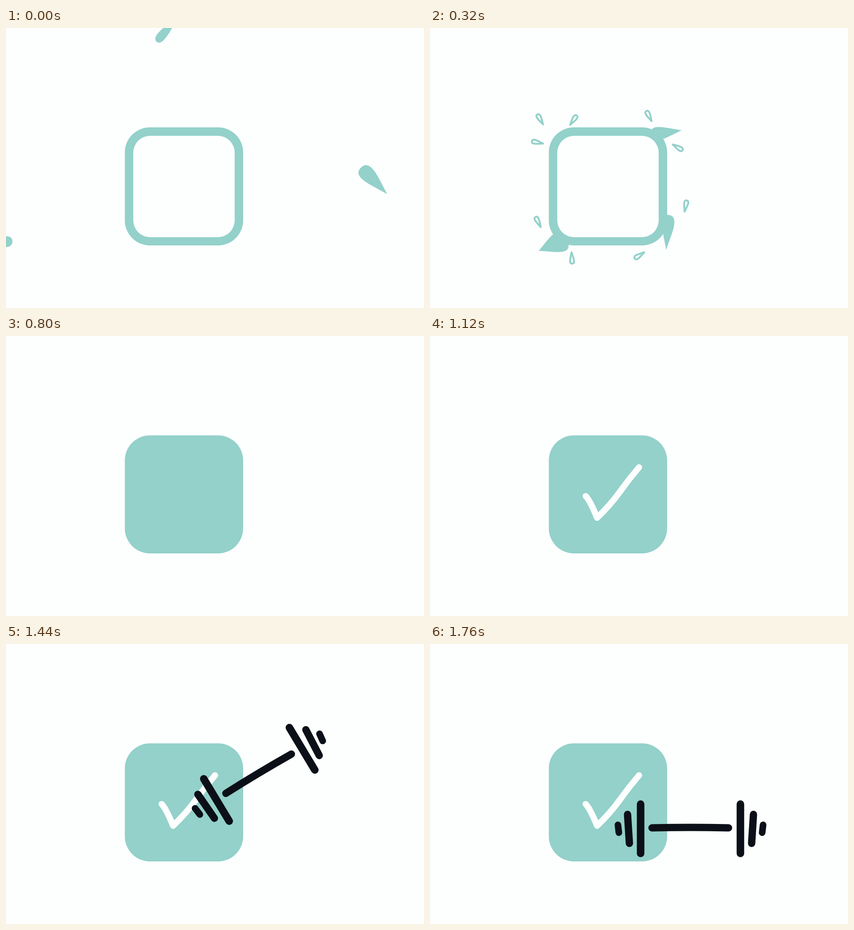
Recreate the animation shown at these times as an HTML page with a canvas. Size 913x613 px, loop 1.84 s.

```html
<!DOCTYPE html>
<html lang="en">
<head>
<meta charset="utf-8">
<title>Checkbox and dumbbell</title>
<style>
  html, body { margin: 0; width: 100%; height: 100%; overflow: hidden; background: #fdfffe; }
  canvas { display: block; }
</style>
</head>
<body>
<canvas id="stage" width="913" height="613"></canvas>
<script>
const ctx = document.getElementById('stage').getContext('2d');
const PAPER = '#fdfffe', MINT = '#93d1ca', INK = '#0b0f17';
const STEP = 80, LOOP = 1840;
const IMPACT = 4, PAINTED = 7, FILLED = 10, CHECKED = 14, FALL = 15, REST = 22;

const rad = degrees => degrees * Math.PI / 180;
const mix = (a, b, t) => a + (b - a) * t;

// Teardrop from tip to round head, bulging by `left` and `right` of its axis
function dropPath({ tip: [x, y], head, left, right }) {
  const dx = head[0] - x, dy = head[1] - y, length = Math.hypot(dx, dy);
  ctx.save();
  ctx.translate(x, y);
  ctx.rotate(Math.atan2(dy, dx));
  ctx.beginPath();
  ctx.moveTo(0, 0);
  ctx.bezierCurveTo(length * 0.4, -left / 2, length, -left * 1.9, length, 0);
  ctx.bezierCurveTo(length, right * 1.9, length * 0.4, right / 2, 0, 0);
  ctx.closePath();
  ctx.restore();
}

const drop = (tip, head, left, right) => ({ tip, head, left, right });
const moved = (d, dx, dy) => ({ ...d, tip: [d.tip[0] + dx, d.tip[1] + dy], head: [d.head[0] + dx, d.head[1] + dy] });
const blend = (a, b, t) => ({
  tip: a.tip.map((v, i) => mix(v, b.tip[i], t)),
  head: a.head.map((v, i) => mix(v, b.head[i], t)),
  left: mix(a.left, b.left, t),
  right: mix(a.right, b.right, t)
});

const topDrop = drop([380, -30], [329, 30], 10, 10);
const bottomDrop = drop([516, 486], [519, 409], 12, 16);
const flights = [
  { steps: IMPACT - 1, from: topDrop, to: moved(topDrop, -60, 205) },
  { steps: IMPACT, from: drop([833, 364], [775, 306], 16, 17), to: drop([550, 224], [484, 226], 20, 9) },
  { steps: IMPACT, from: drop([-60, 468], [14, 467], 12, 13), to: drop([237, 488], [295, 455], 17, 30) },
  { steps: IMPACT, from: moved(bottomDrop, 20, 250), to: bottomDrop }
];

// Tip and direction of each droplet thrown off the box
const splashes = [
  [247, 211, -120], [306, 212, -55], [484, 204, -117],
  [530, 255, 30], [556, 402, -79], [247, 253, -168],
  [242, 436, -117], [309, 491, 86], [468, 491, 147]
];

// Edge of the paint that grows out of each inner corner
const paint = [
  { corner: [278, 236], edge: [[352, 236], [348, 273], [326, 320], [278, 351]] },
  { corner: [500, 236], edge: [[416, 236], [426, 280], [452, 320], [474, 326], [500, 302]] },
  { corner: [500, 458], edge: [[500, 346], [487, 342], [450, 356], [443, 400], [441, 458]] },
  { corner: [278, 458], edge: [[278, 379], [307, 361], [335, 384], [362, 435], [384, 458]] }
];

const check = new Path2D('M340 350.5Q349 359 365 398Q394 370 414 342T456.5 287.5');
const CHECK_LENGTH = 200;

function drawBox(filled) {
  ctx.fillStyle = MINT;
  ctx.beginPath();
  ctx.roundRect(259.5, 217.5, 258.5, 258.5, 55);
  if (!filled) ctx.roundRect(278, 236, 221.5, 222, 37);
  ctx.fill('evenodd');
}

function drawDrops(step) {
  for (const { steps, from, to } of flights) {
    if (step > steps) continue;
    dropPath(blend(from, to, step / steps));
    ctx.fill();
  }
}

function drawSplash(age) {
  const length = 25 - 10 * age, travel = 14 * age;
  ctx.strokeStyle = MINT;
  ctx.lineWidth = 4;
  for (const [x, y, degrees] of splashes) {
    const along = d => [x + d * Math.cos(rad(degrees)), y + d * Math.sin(rad(degrees))];
    dropPath(drop(along(travel), along(travel + length), 4.5, 4.5));
    ctx.stroke();
  }
}

// Catmull-Rom curve through the points
function curveThrough(pts) {
  ctx.moveTo(...pts[0]);
  for (let i = 0; i < pts.length - 1; i++) {
    const b = pts[i], c = pts[i + 1], a = pts[i - 1] ?? b, d = pts[i + 2] ?? c;
    ctx.bezierCurveTo(b[0] + (c[0] - a[0]) / 6, b[1] + (c[1] - a[1]) / 6,
                      c[0] - (d[0] - b[0]) / 6, c[1] - (d[1] - b[1]) / 6, ...c);
  }
}

function drawPaint(scale) {
  ctx.save();
  ctx.beginPath();
  ctx.rect(277, 235, 223.5, 224);
  ctx.clip();
  for (const { corner, edge } of paint) {
    ctx.beginPath();
    curveThrough(edge.map(point => point.map((v, i) => mix(corner[i], v, scale))));
    ctx.lineTo(...corner);
    ctx.fill();
  }
  ctx.restore();
}

function drawCheck(part) {
  ctx.strokeStyle = PAPER;
  ctx.lineWidth = 13.5;
  ctx.setLineDash([CHECK_LENGTH * part, CHECK_LENGTH * 2]);
  ctx.stroke(check);
  ctx.setLineDash([]);
}

function drawDumbbell(x, y, degrees) {
  const line = (width, x0, y0, x1, y1, bend = 0) => {
    ctx.lineWidth = width;
    ctx.beginPath();
    ctx.moveTo(x0, y0);
    ctx.quadraticCurveTo((x0 + x1) / 2, (y0 + y1) / 2 + bend, x1, y1);
    ctx.stroke();
  };
  ctx.save();
  ctx.translate(x, y);
  ctx.rotate(rad(degrees));
  ctx.strokeStyle = INK;
  line(16, -84, 0, 83, 0, -2);
  for (const side of [-1, 1]) {
    line(16.5, side * 109, -52, side * 109, 56);
    line(16, side * 137.5, -29.5, side * 133.5, 34);
    line(14.5, side * 158.5, -6.5, side * 156.5, 10.5);
  }
  ctx.restore();
}

function draw(step) {
  ctx.fillStyle = PAPER;
  ctx.fillRect(0, 0, 913, 613);
  drawBox(step >= FILLED);
  if (step <= IMPACT) drawDrops(step);
  if (step === IMPACT || step === IMPACT + 1) drawSplash(step - IMPACT);
  if (step > IMPACT && step < FILLED) drawPaint(1 + (step - PAINTED) * 0.32);
  if (step > FILLED) drawCheck(Math.min(1, (step - FILLED) / (CHECKED - FILLED)));
  if (step >= FALL) {
    // Steady fall that overshoots, then snaps back to rest
    const lead = step < REST ? step - REST + 1.6 : 0;
    drawDumbbell(569 + 7 * lead, 402.5 + 49.5 * lead, 12.9 * lead);
  }
}

ctx.lineCap = ctx.lineJoin = 'round';
const start = performance.now();
function tick() {
  draw(Math.floor((performance.now() - start) % LOOP / STEP));
  requestAnimationFrame(tick);
}
tick();
</script>
</body>
</html>
```
